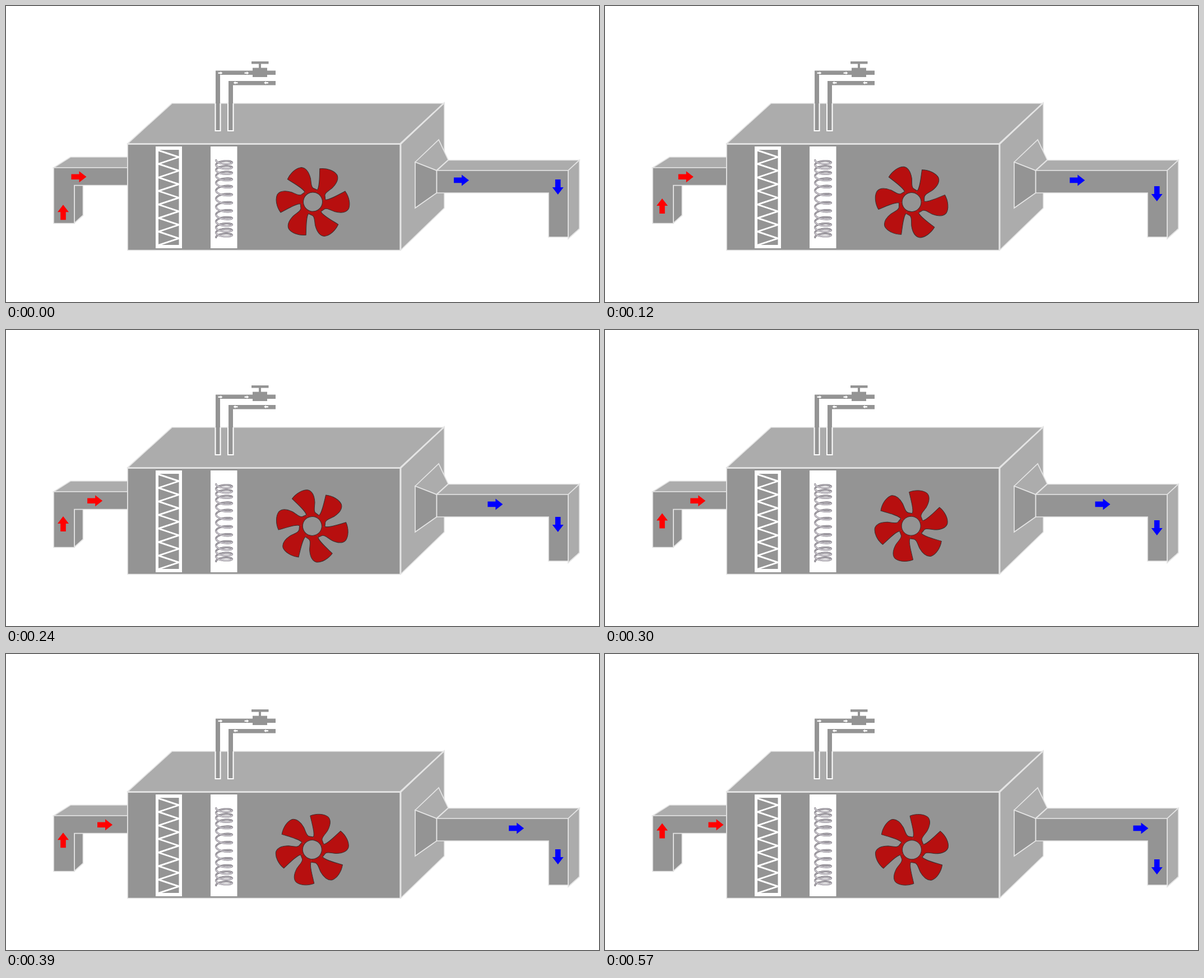
Animation, 1058 px wide and 529 px high, one loop 600 ms. Source, as an HTML page:

```html
<!DOCTYPE html>
<html lang="en">
<head>
<meta charset="utf-8">
<title>Air handling unit</title>
<style>
html, body { margin: 0; width: 100%; height: 100%; overflow: hidden; background: #fff; }
svg { display: block; width: 100%; height: 100%; }
.front { fill: #949494; stroke: #e4e4e4; stroke-width: 1.7; }
.shade { fill: #acacac; stroke: #e4e4e4; stroke-width: 1.7; }
.pipe { fill: #949494; }
.rim { fill: none; stroke: #fff; stroke-width: 2; }
#coil path { fill: none; stroke-linecap: round; stroke-linejoin: round; }
</style>
</head>
<body>
<svg viewBox="0 0 1058 529">
  <defs>
    <path id="arrow" d="M-13.5-4.8H.5V-10L13.5 0 .5 10V4.8H-13.5z"/>
    <path id="blade" d="M0 0L2-22.5C5-28 0-45-3.5-60.5C8-65 22-64 29-58C35-51 31-40 27-33C23-27 15-20 18.5-15L20.5-9.5z"/>
    <path id="edge" d="M2-22.5C5-28 0-45-3.5-60.5C8-65 22-64 29-58C35-51 31-40 27-33C23-27 15-20 18.5-15L20.5-9.5"/>
  </defs>

  <g id="inlet">
    <path class="shade" d="M85 289L115 270H217V289z"/>
    <path class="front" d="M122 320.5H137.500V374L122 388z"/>
    <path class="front" d="M85 289H217V320.500H122V388.500H85z"/>
  </g>

  <g id="box">
    <path class="shade" d="M217 246L296 174H781L703 246z"/>
    <path class="shade" d="M704.500 247L782 173V361L704.500 436z"/>
    <path class="front" d="M217 247H703.500V436.500H217z"/>
    <path d="M217 246.500H703.500L781.500 173.500M703.800 247V436" fill="none" stroke="#e4e4e4" stroke-width="2.6"/>
  </g>

  <g id="outlet">
    <path class="shade" d="M730 279L772 239L789 275L768 294z"/>
    <path class="front" d="M730 279L768.500 294V334L730 361z"/>
    <path class="shade" d="M768.500 294L789 275.500H1023L1003 294z"/>
    <path class="shade" d="M1003 294L1023 275.500V398L1003 416z"/>
    <path class="front" d="M768.500 294H1003V413H968V334H768.500z"/>
  </g>

  <g id="pipes">
    <path class="pipe" d="M374 222.500V115.500H481V123H382V222.500zM397 222.500V134H481V141.500H405V222.500z"/>
    <path class="pipe" d="M440 110.500H451V103.500H438V99H468.500V103.500H455V110.500H466V127H440z"/>
    <path class="rim" d="M373.500 174V223H382.500V174M396 174V223H405.500V174"/>
    <g id="marks" fill="#fff"></g>
  </g>

  <path d="M267 251H314V433H267z" fill="#fff"/>
  <path class="pipe" d="M272 257H308.500V427H272z"/>
  <path id="zigzag" fill="none" stroke="#fff" stroke-width="3"/>

  <path d="M365 251H412.500V433H365z" fill="#fff"/>
  <g id="coil"></g>

  <g id="fan" stroke="#3a3030" stroke-width="1">
    <g id="blades"></g>
    <circle r="17" fill="#949494"/>
  </g>

  <g fill="#f00"><use href="#arrow" id="redAcross"/><use href="#arrow" id="redUp"/></g>
  <g fill="#00f"><use href="#arrow" id="blueAcross"/><use href="#arrow" id="blueDown"/></g>
</svg>
<script>
const LOOP = 600, STEP = 30;
const $ = id => document.getElementById(id);

function add(parent, tag, attrs) {
  const el = document.createElementNS("http://www.w3.org/2000/svg", tag);
  for (const name in attrs) el.setAttribute(name, attrs[name]);
  return parent.appendChild(el);
}

function place(id, x, y, angle = 0) {
  $(id).setAttribute("transform", `translate(${x} ${y}) rotate(${angle})`);
}

// Flow marks on the water pipes
for (const [x, y, dir] of [[382.5, 119.8, 1], [429.500, 119.8, 1], [409.500, 137.300, -1], [464, 137.300, -1]]) {
  add($("marks"), "use", { href: "#arrow", transform: `translate(${x} ${y}) scale(${dir * 0.29} .27)` });
}

// Filter pleats
let pleats = "M272 258";
for (let i = 1; i < 15; i++) pleats += `L${i % 2 ? 308.5 : 272} ${258 + i * 12.1}`;
$("zigzag").setAttribute("d", pleats);

// Helical coil with closed end turns; the rear half-turns lie underneath
const TURNS = 12;
function coilPoint(turn) {
  const u = turn / TURNS;
  const y = 275.5 + 138 * (u - 0.045 * Math.sin(2 * Math.PI * u));
  const a = 2 * Math.PI * turn;
  return [389 - 14.3 * Math.cos(a), y + 4.6 * Math.sin(a)];
}
function halfTurns(offset) {
  let d = "";
  for (let n = 0; n < TURNS; n++) {
    for (let i = 0; i <= 16; i++) {
      const [x, y] = coilPoint(n + offset + i / 32);
      d += `${i ? "L" : "M"}${x.toFixed(1)} ${y.toFixed(1)}`;
    }
  }
  return d;
}
function wire(d, tones) {
  tones.forEach((stroke, i) => add($("coil"), "path", { d, stroke, "stroke-width": [3.2, 2.1, 0.8][i] }));
}
wire(halfTurns(0.5), ["#77737a", "#98949b", "#bdb9c0"]);
wire(halfTurns(0), ["#858188", "#b4b0b8", "#e6e2e9"]);

// Fan rotor
for (const [href, fill, stroke] of [["#blade", "#b70f0f", "none"], ["#edge", "none", "#3a3030"]]) {
  for (let a = 0; a < 360; a += 60) {
    add($("blades"), "use", { href, fill, stroke, transform: `rotate(${a})` });
  }
}

// The fan turns a little faster in the second half of the loop
function fanAngle(i) {
  return i < 10 ? 16.5 * i : 165 + 20 * (i - 10);
}

function draw(ms) {
  const i = Math.floor((ms % LOOP) / STEP);
  const angle = fanAngle(i), a = angle * Math.PI / 180;
  place("fan", 546.8 + 0.7 * Math.cos(a), 350 + 0.6 * Math.sin(a), angle + 15);
  place("redAcross", 130 + 3.58 * i, 305.3);
  place("redUp", 102, 368.7 - 2.77 * i, -90);
  place("blueAcross", 812.5 + 7.55 * i, 311.4);
  place("blueDown", 984.7, 323.4 + 3 * i, 90);
}

let start;
function tick(now) {
  start ??= now;
  draw(now - start);
  requestAnimationFrame(tick);
}
draw(0);
requestAnimationFrame(tick);
</script>
</body>
</html>
```
